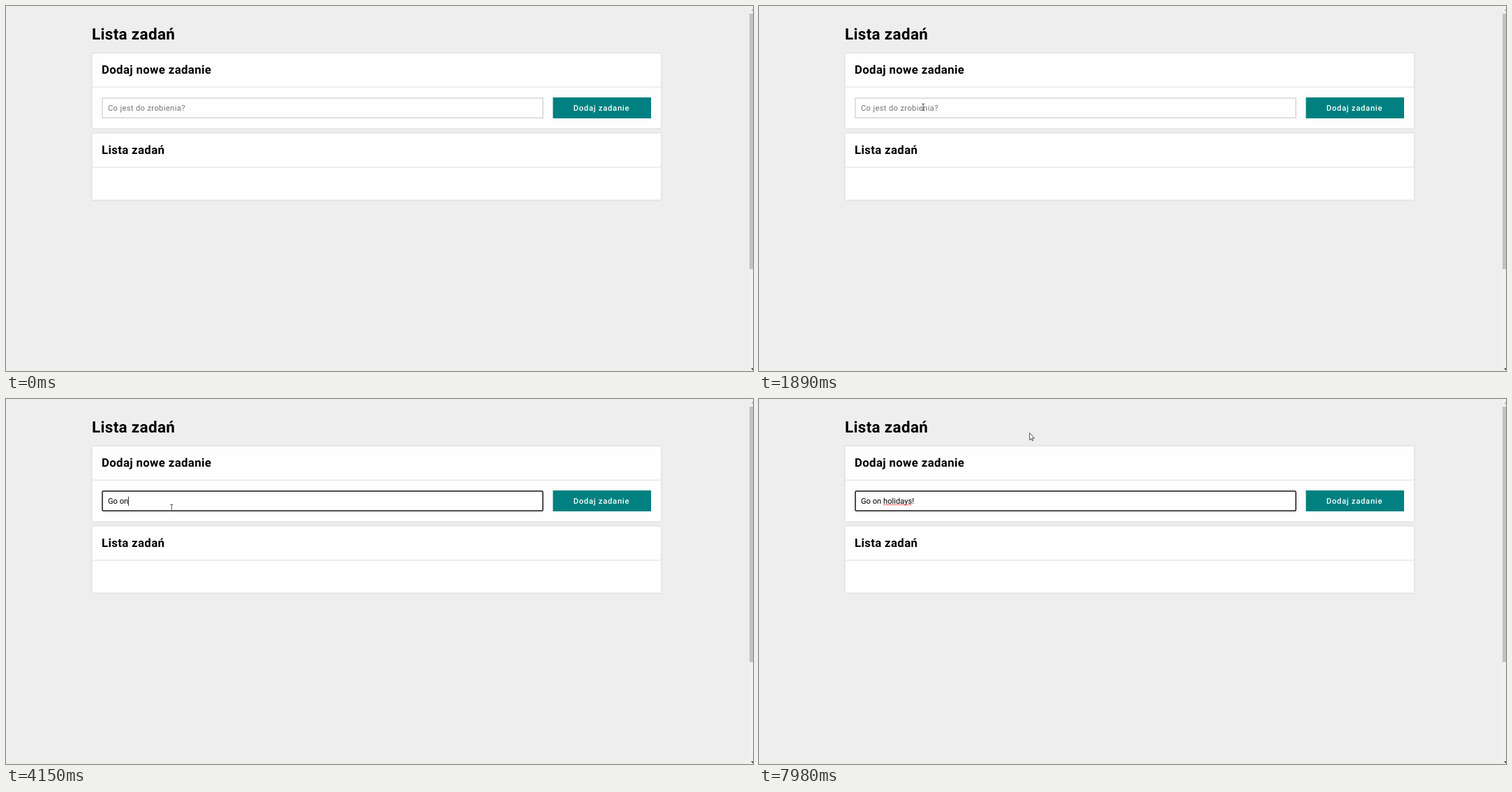
Write an HTML page that moves like this. It is 1070x523 px and loops after 8 s.

```html
<!DOCTYPE html>
<html lang="pl">
<head>
<meta charset="utf-8">
<title>Lista zadań</title>
<style>
  html, body { margin: 0; width: 100%; height: 100%; overflow: hidden; background: #eee; }
  svg { display: block; width: 100%; height: 100%; }
  text { font-family: Roboto, Arial, sans-serif; white-space: pre; text-rendering: geometricPrecision; }
  .h1 { font-size: 22.4px; font-weight: 700; letter-spacing: .35px; }
  .h2 { font-size: 16.8px; font-weight: 700; letter-spacing: .35px; }
  .field { font-size: 11.2px; }
  .hint { fill: #757575; letter-spacing: .35px; }
  .button { fill: #fff; font-weight: 500; letter-spacing: .75px; }
  .card { fill: #fefefe; filter: drop-shadow(0 .5px 1px rgba(0, 0, 0, .18)); }
  .rule { fill: #e8e8e8; }
</style>
</head>
<body>
<svg viewBox="0 0 1070 523" preserveAspectRatio="none">
  <rect width="1070" height="523" fill="#eee"/>
  <text class="h1" x="123" y="48">Lista zadań</text>

  <rect class="card" x="123.5" y="68" width="814.7" height="107.3"/>
  <rect class="rule" x="123.5" y="115.5" width="814.7" height="1.5"/>
  <text class="h2" x="137" y="97">Dodaj nowe zadanie</text>

  <rect class="card" x="123.5" y="182.4" width="814.7" height="95.3"/>
  <rect class="rule" x="123.5" y="230.3" width="814.7" height="1.5"/>
  <text class="h2" x="137" y="211.7">Lista zadań</text>

  <rect id="box" x="138" y="132" width="631" height="28.2" fill="#fefefe" stroke-width="1.5"/>
  <text id="hint" class="field hint" x="145.9" y="150">Co jest do zrobienia?</text>
  <text id="typed" class="field" x="145.9" y="150"></text>
  <path id="squiggle" fill="none" stroke="#e33" stroke-width=".9"/>
  <rect id="caret" y="140" width="1" height="13" fill="#333"/>

  <rect x="783.4" y="131" width="140.6" height="30" fill="#008080"/>
  <text class="field button" x="812.7" y="150">Dodaj zadanie</text>

  <rect x="1065" width="5" height="523" fill="#f1f1f1"/>
  <rect x="1065" y="11" width="5" height="366" fill="#c1c1c1"/>
  <path d="M1067.3 6.7L1071 3.2V6.7Z" fill="#a3a3a3"/>
  <path d="M1067 519.3H1071V523Z" fill="#222"/>

  <path id="arrow" d="M0 0V10L2.4 8.1L3.8 11.3L5.1 10.7L3.7 7.5H6.8Z" fill="#fff" stroke="#222" stroke-width=".8"/>
  <path id="beam" d="M-2 -4.6H2M0 -4.6V4.6M-2 4.6H2" fill="none" stroke="#444" stroke-width=".9"/>
</svg>
<script>
const LOOP = 8000, FOCUS = 2030, FIRST_KEY = 2950, BLINK = 526, SPELLCHECK = 7120;
const TEXT_X = 145.9, POINTER_START = 100, POINTER_STEP = 70;
const MESSAGE = "Go on holidays!";

// Pointer waypoints, joined by a smooth curve
const waypoints = [
  { t: 100, x: 993, y: 519 },
  { t: 660, x: 540, y: 322 },
  { t: 870, x: 443.4, y: 338 },
  { t: 1220, x: 194.7, y: 129 },
  { t: 1430, x: 144, y: 127 },
  { t: 1890, x: 237.5, y: 145.3 },
  { t: 7660, x: 237.5, y: 145.3 },
  { t: 7940, x: 387.6, y: 48.6 }
];

const [box, hint, typed, squiggle, caret, arrow, beam] =
  ["box", "hint", "typed", "squiggle", "caret", "arrow", "beam"]
    .map(id => document.getElementById(id));

const show = (el, on) => el.setAttribute("visibility", on ? "visible" : "hidden");

let wave = "M178 152.1";
for (let x = 179.5, up = true; x <= 219.5; x += 1.5, up = !up) wave += `L${x} ${up ? 151 : 152.1}`;
squiggle.setAttribute("d", wave);

// Shifted keys are slowest, keys around a space slower than letters within a word.
function keyDelay(i) {
  if (i === 1 || MESSAGE[i] === "!") return 405;
  return MESSAGE.slice(i - 1, i + 1).includes(" ") ? 230 : 165;
}

const keyTimes = [FIRST_KEY];
for (let i = 1; i < MESSAGE.length; i++) keyTimes.push(keyTimes[i - 1] + keyDelay(i));

function slope(i, axis) {
  const a = waypoints[Math.max(i - 1, 0)];
  const b = waypoints[Math.min(i + 1, waypoints.length - 1)];
  return (b[axis] - a[axis]) / (b.t - a.t);
}

function pointerAt(t, axis) {
  const last = waypoints.length - 1;
  if (t >= waypoints[last].t) return waypoints[last][axis];
  const i = Math.max(waypoints.findIndex(p => p.t > t) - 1, 0);
  const a = waypoints[i], b = waypoints[i + 1];
  const span = b.t - a.t, u = Math.max(0, (t - a.t) / span), v = 1 - u;
  return v * v * (1 + 2 * u) * a[axis] + u * u * (1 + 2 * v) * b[axis]
    + span * u * v * (v * slope(i, axis) - u * slope(i + 1, axis));
}

function drawPointer(t) {
  const visible = t >= POINTER_START;
  const snapped = t - (t - POINTER_START) % POINTER_STEP;
  const x = pointerAt(snapped, "x"), y = pointerAt(snapped, "y");
  const inField = x > 137 && x < 770 && y > 131 && y < 161;
  (inField ? beam : arrow).setAttribute("transform", `translate(${x} ${y})`);
  show(arrow, visible && !inField);
  show(beam, visible && inField);
}

function drawField(t) {
  const focused = t >= FOCUS;
  const count = keyTimes.filter(k => k <= t).length;
  box.setAttribute("stroke", focused ? "#151515" : "#d6d6d6");
  box.setAttribute("rx", focused ? 1.5 : 0);
  typed.textContent = MESSAGE.slice(0, count);
  show(hint, !count);
  show(squiggle, t >= SPELLCHECK);

  const lastEdit = count ? keyTimes[count - 1] : FOCUS;
  const width = count ? typed.getComputedTextLength() : 0;
  caret.setAttribute("x", Math.max(146, Math.floor(TEXT_X + width)));
  show(caret, focused && Math.floor((t - lastEdit) / BLINK) % 2 === 0);
}

function draw(t) {
  drawField(t);
  drawPointer(t);
}

const start = performance.now();
function tick(now) {
  draw(Math.max(0, now - start) % LOOP);
  requestAnimationFrame(tick);
}
draw(0);
requestAnimationFrame(tick);
</script>
</body>
</html>
```
